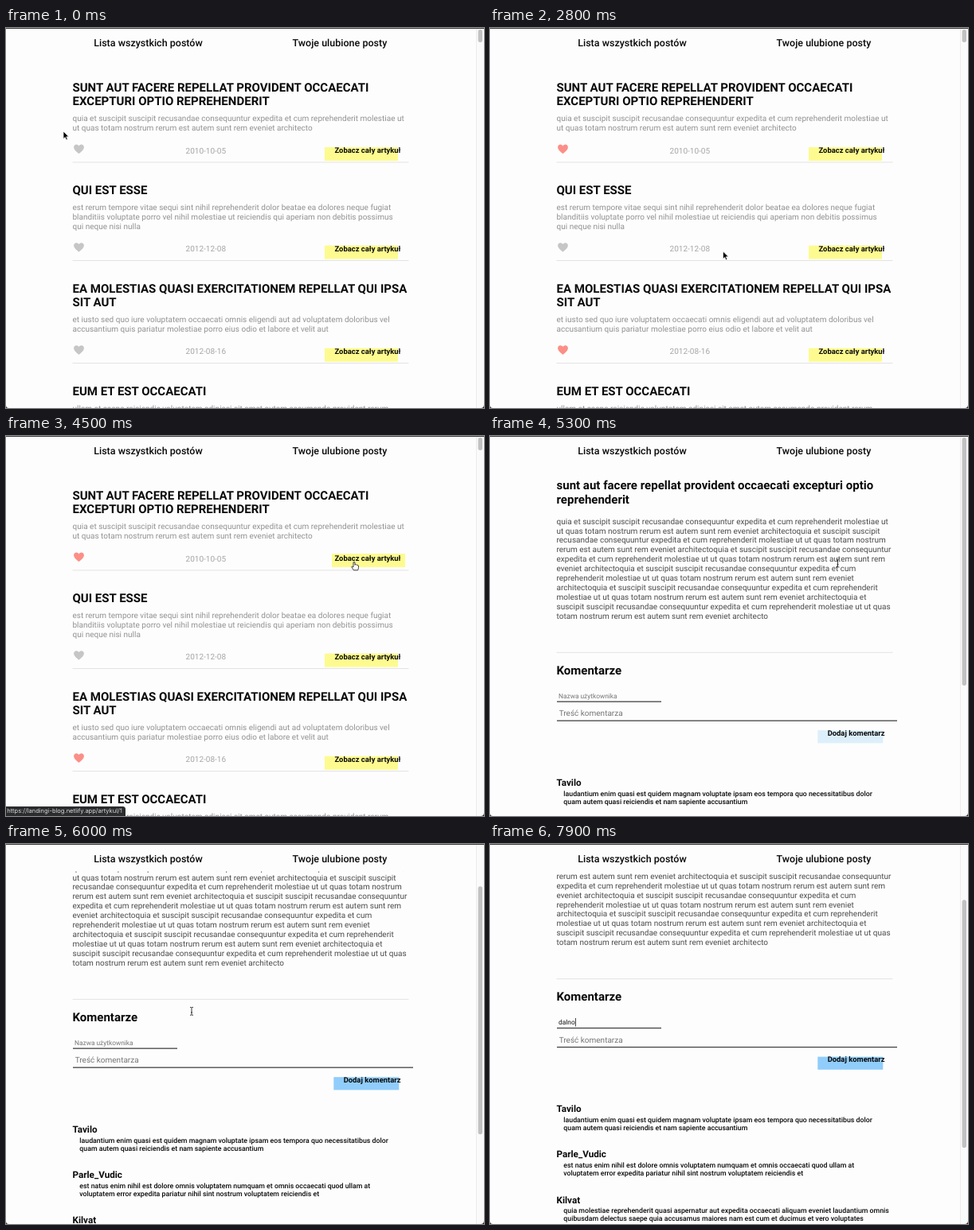
These frames come from a looping animation (600 px wide and 478 px high, 8000 ms). An HTML page:

```html
<!DOCTYPE html>
<html lang="pl">
<head>
<meta charset="utf-8">
<title>Blog</title>
<style>
  html, body { margin: 0; width: 100%; height: 100%; overflow: hidden; background: #fdfdfd; }
  svg { display: block; width: 100%; height: 100%; }
  text { font-family: Roboto, sans-serif; text-rendering: geometricPrecision; white-space: pre; }
  .nav { font-size: 12.5px; font-weight: 500; fill: #0a0a0a; }
  .title { font-size: 15.02px; font-weight: 700; fill: #0a0a0a; }
  .lead { font-size: 10.03px; fill: #929292; }
  .date { font-size: 10.03px; fill: #a6a6a6; }
  .body { font-size: 10.03px; fill: #4c4c4c; }
  .button { font-size: 9.42px; font-weight: 700; fill: #0a0a0a; text-anchor: end; }
  .name { font-size: 11.7px; font-weight: 700; fill: #0a0a0a; }
  .comment { font-size: 8.78px; font-weight: 500; fill: #0a0a0a; }
  .small { font-size: 8.36px; fill: #757575; }
  .field { font-size: 10px; fill: #757575; }
  .option { font: 600 8.1px Inter, sans-serif; fill: #e9e9e9; }
  .status { font: 400 7.53px Inter, sans-serif; fill: #dcdcdc; }
</style>
</head>
<body>
<svg id="stage" viewBox="0 0 600 478"></svg>
<script>
const LOOP = 8000, STEP = 100, LEFT = 83.5;
const GREY = '#c6c6c6', RED = '#fb8f88';
const SCROLL_END = 102.6;

const posts = [
  { title: ['SUNT AUT FACERE REPELLAT PROVIDENT OCCAECATI', 'EXCEPTURI OPTIO REPREHENDERIT'],
    lead: ['quia et suscipit suscipit recusandae consequuntur expedita et cum reprehenderit molestiae ut',
           'ut quas totam nostrum rerum est autem sunt rem eveniet architecto'],
    date: '2010-10-05', liked: 800 },
  { title: ['QUI EST ESSE'],
    lead: ['est rerum tempore vitae sequi sint nihil reprehenderit dolor beatae ea dolores neque fugiat',
           'blanditiis voluptate porro vel nihil molestiae ut reiciendis qui aperiam non debitis possimus',
           'qui neque nisi nulla'],
    date: '2012-12-08', liked: Infinity },
  { title: ['EA MOLESTIAS QUASI EXERCITATIONEM REPELLAT QUI IPSA', 'SIT AUT'],
    lead: ['et iusto sed quo iure voluptatem occaecati omnis eligendi aut ad voluptatem doloribus vel',
           'accusantium quis pariatur molestiae porro eius odio et labore et velit aut'],
    date: '2012-08-16', liked: 1700 },
  { title: ['EUM ET EST OCCAECATI'],
    lead: ['ullam et saepe reiciendis voluptatem adipisci sit amet autem assumenda provident rerum'],
    date: '', liked: Infinity }
];

const comments = [
  ['Tavilo', 'laudantium enim quasi est quidem magnam voluptate ipsam eos tempora quo necessitatibus dolor',
   'quam autem quasi reiciendis et nam sapiente accusantium'],
  ['Parle_Vudic', 'est natus enim nihil est dolore omnis voluptatem numquam et omnis occaecati quod ullam at',
   'voluptatem error expedita pariatur nihil sint nostrum voluptatem reiciendis et'],
  ['Kilvat', 'quia molestiae reprehenderit quasi aspernatur aut expedita occaecati aliquam eveniet laudantium omnis',
   'quibusdam delectus saepe quia accusamus maiores nam est cum et ducimus et vero voluptates']
];

const options = ['asdasd', 'asdads', 'ffff', 'ffaaaa', 'sdasd', 'dasd'];
const userName = 'dalno';

// [time, x, y]
const pointerKeys = [
  [0, 72, 130], [700, 91, 149], [1000, 91, 149], [1600, 91, 403], [1900, 91, 403],
  [2800, 292.5, 281], [3400, 437, 158], [4600, 437, 158], [4700, 436.5, 160], [5300, 436.5, 160],
  [5800, 317, 201], [6100, 191, 215], [6400, 165.5, 225]
];
const scrollKeys = [[5500, 0], [5800, 7.5], [5900, 36], [6000, 77], [6100, SCROLL_END]];
const hoverKeys = [[3200, 0], [3500, 1]];
const statusKeys = [[3400, 0], [3600, 1], [4800, 1], [5000, 0]];
const typeTimes = [7100, 7300, 7500, 7600, 7700];

const stage = document.getElementById('stage');

function el(tag, attrs, parent = stage, content) {
  const node = document.createElementNS('http://www.w3.org/2000/svg', tag);
  set(node, attrs);
  if (content !== undefined) node.textContent = content;
  parent.appendChild(node);
  return node;
}
function set(node, attrs) {
  for (const key in attrs) node.setAttribute(key, attrs[key]);
}
const show = (node, on) => set(node, { display: on ? 'inline' : 'none' });
const group = (parent = stage) => el('g', {}, parent);
const text = (parent, cls, x, y, str) => el('text', { class: cls, x, y }, parent, str);
const rect = (parent, x, y, width, height, fill, rx = 0) =>
  el('rect', { x, y, width, height, fill, rx }, parent);
const rule = (parent, y) => rect(parent, LEFT, y - 0.5, 422, 1, '#e3e3e3');

function track(keys, t) {
  const next = keys.findIndex(k => k[0] > t);
  if (next === 0) return keys[0].slice(1);
  if (next < 0) return keys[keys.length - 1].slice(1);
  const a = keys[next - 1], b = keys[next], p = (t - a[0]) / (b[0] - a[0]);
  return a.slice(1).map((v, i) => v + (b[i + 1] - v) * p);
}

function wrap(str, max) {
  const lines = [''];
  for (const word of str.split(' ')) {
    const last = lines[lines.length - 1];
    if (last && last.length + 1 + word.length > max) lines.push(word);
    else lines[lines.length - 1] = last ? last + ' ' + word : word;
  }
  return lines;
}

rect(stage, 0, 0, 600, 478, '#fdfdfd');

// Post list
const list = group();
const hearts = [];
let firstMark;
let y = 79.8;
for (const post of posts) {
  post.title.forEach((line, i) => text(list, 'title', LEFT, y + i * 17.5, line));
  y += (post.title.length - 1) * 17.5 + 19.9;
  post.lead.forEach((line, i) => text(list, 'lead', LEFT, y + i * 12, line));
  y += (post.lead.length - 1) * 12 + 39.7;
  if (post.date) {
    rule(list, y);
    const mid = y - 16.6;
    const heart = el('path', {
      d: 'M0 5.9C-2.5 3.6-6.4 1-6.4-2.3C-6.4-4.4-4.9-5.7-3.2-5.7C-1.9-5.7-.7-5 0-3.9C.7-5 1.9-5.7 3.2-5.7C4.9-5.7 6.4-4.4 6.4-2.3C6.4 1 2.5 3.6 0 5.9Z',
      transform: `translate(91.5 ${mid})`
    }, list);
    hearts.push({ heart, mid, liked: post.liked });
    text(list, 'date', 225.5, y - 11.4, post.date);
    const mark = rect(list, 400, y - 18.9, 92, 17, '#fdfb8f');
    firstMark = firstMark || mark;
    text(list, 'button', 495.5, y - 12, 'Zobacz cały artykuł');
  }
  y += 40;
}

// Article
const article = group();
['sunt aut facere repellat provident occaecati excepturi optio', 'reprehenderit']
  .forEach((line, i) => text(article, 'title', LEFT, 67.3 + i * 17.5, line));
wrap(posts[0].lead.join(' ').repeat(6), 92)
  .forEach((line, i) => text(article, 'body', LEFT, 110.6 + i * 11.92, line));
rule(article, 272.3);
text(article, 'title', LEFT, 299.8, 'Komentarze');
const nameField = text(article, 'small', 86, 329.6, '');
const caret = rect(article, 86, 321.6, 0.8, 10.5, '#111');
rect(article, 84, 333.5, 131, 1.3, '#444');
text(article, 'field', 86.7, 352.4, 'Treść komentarza');
rect(article, 84, 357.5, 427, 1.3, '#444');
const addMark = rect(article, 411.3, 370.2, 82, 16.2, '#90cdfb');
text(article, 'button', 495.5, 377.1, 'Dodaj komentarz');
comments.forEach(([name, ...lines], i) => {
  const top = 439.9 + i * 57.2;
  text(article, 'name', LEFT, top, name);
  lines.forEach((line, j) => text(article, 'comment', 92.3, top + 12.8 + j * 10, line));
});

// Header
rect(stage, 0, 0, 590, 34.5, '#fdfdfd');
text(stage, 'nav', 110.2, 22.6, 'Lista wszystkich postów');
text(stage, 'nav', 359.5, 22.6, 'Twoje ulubione posty');

// Autofill menu
const menu = group();
set(menu, { style: 'filter: drop-shadow(0 1px 2px rgba(0,0,0,.4))' });
const menuBox = rect(menu, 83.5, 234, 132, 145, '#242526', 2.5);
const menuItems = options.map((label, i) => text(menu, 'option', 91, 253.4 + i * 22.5, label));

// Window frame and scrollbar
rect(stage, 590, 0, 10, 478, '#fafafa');
rect(stage, 590, 0, 0.8, 478, '#e9e9e9');
const thumb = rect(stage, 592.6, 2, 5.4, 16, '#c1c1c1', 2.7);
rect(stage, 0, 0, 600, 1, '#3c3c3c');

const status = group();
el('path', { d: 'M0 466H146.5Q150 466 150 469.5V478H0Z', fill: '#2b2c2e' }, status);
text(status, 'status', 1.2, 474.4, 'https://landingi-blog.netlify.app/artykul/1');
el('path', { d: 'M0 474.5V478H3.5Q0 478 0 474.5ZM600 474V478H596Q600 478 600 474Z', fill: '#222' });

// Pointers, each with its hot spot at the origin
const pointer = group();
const arrow = el('path', {
  d: 'M0 0V9.4L2.2 7.4L3.7 10.8L5.3 10.1L3.8 6.8H6.8Z',
  fill: '#000', stroke: '#fff', 'stroke-width': 0.7
}, pointer);
const hand = el('path', {
  d: 'M-1 1Q0-.2 1 1V4.3L1.3 3.7Q2.3 3.2 2.8 4.2Q3.9 3.5 4.3 4.7Q5.4 4.3 5.5 5.6V7.4Q5.4 9 4.6 10.8H-.6Q-2.1 8.6-3.2 6.7Q-3.1 5.3-1 6.8Z',
  fill: '#fff', stroke: '#111', 'stroke-width': 0.8, 'stroke-linejoin': 'round'
}, pointer);
const beam = el('path', {
  d: 'M-2-5Q-.3-5 0-4.2Q.3-5 2-5M0-4.2V4.2M-2 5Q-.3 5 0 4.2Q.3 5 2 5M-1 1.6H1',
  fill: 'none', stroke: '#222', 'stroke-width': 0.9
}, pointer);

function drawPointer(t, inArticle) {
  const [x, y] = track(pointerKeys, t);
  const overHeart = x > 84 && x < 99 && hearts.some(h => Math.abs(y - h.mid) < 7);
  const overButton = x > 400 && y > 146 && y < 168;
  const pointing = !inArticle && (overHeart || overButton);
  set(pointer, { transform: `translate(${x} ${y})` });
  show(pointer, t < typeTimes[0]);
  show(arrow, !inArticle && !pointing);
  show(hand, pointing);
  show(beam, inArticle);
}

function drawForm(t) {
  const typed = userName.slice(0, typeTimes.filter(at => t >= at).length);
  nameField.textContent = typed || 'Nazwa użytkownika';
  set(nameField, { style: typed ? 'fill:#111' : '' });
  set(caret, { x: 86.3 + (typed ? nameField.getComputedTextLength() : 0) });
  show(caret, t >= 6600);

  const filtered = t >= 7200;
  show(menu, t >= 6600 && t < 7500);
  set(menuBox, { height: filtered ? 32.5 : 145 });
  menuItems.forEach((item, i) => {
    item.textContent = filtered && i === 0 ? 'dasd' : options[i];
    show(item, !filtered || i === 0);
  });
}

function draw(t) {
  const inArticle = t >= 4600;
  const [scroll] = track(scrollKeys, t);
  const [hover] = track(hoverKeys, t);

  show(list, !inArticle);
  show(article, inArticle);
  set(article, { transform: `translate(0 ${-scroll})` });
  set(thumb, { y: 2 + scroll * 0.664, height: inArticle ? 312 : 16 });
  hearts.forEach(({ heart, liked }) => set(heart, { fill: t >= liked ? RED : GREY }));
  set(firstMark, { transform: `translate(${hover * 9} ${hover * -2})` });
  set(addMark, { fill: t < 5400 ? '#dceffa' : '#90cdfb' });
  set(status, { opacity: track(statusKeys, t)[0] });
  drawForm(t);
  drawPointer(t, inArticle);
}

const start = performance.now();
function tick() {
  const t = (performance.now() - start) % LOOP;
  draw(Math.floor(t / STEP) * STEP);
  requestAnimationFrame(tick);
}
tick();
</script>
</body>
</html>
```
